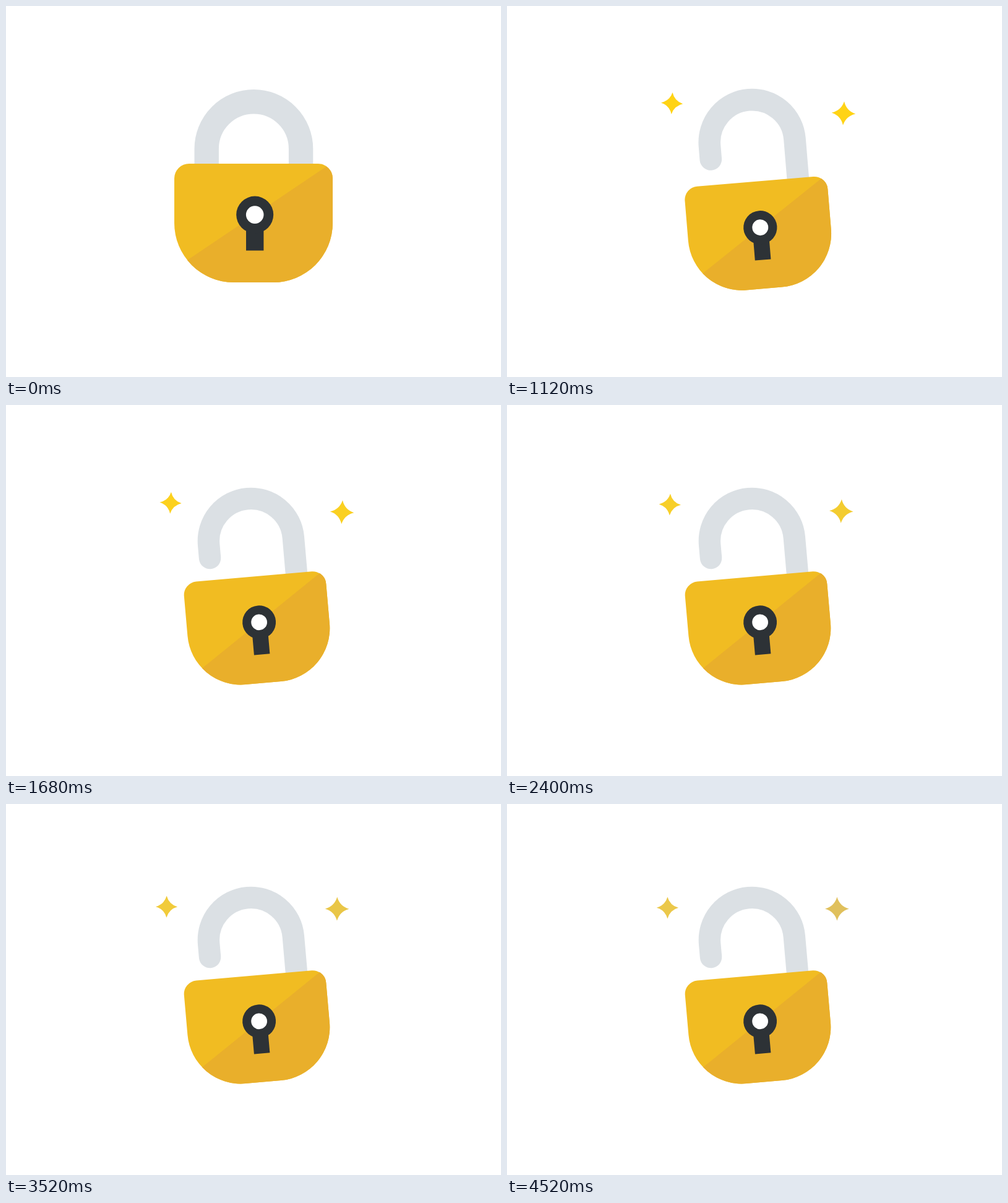
These frames come from a looping animation (800 by 600 pixels, 4.56 s). An HTML page:

```html
<!DOCTYPE html>
<html lang="en">
<head>
<meta charset="utf-8">
<title>Padlock</title>
<style>
  html, body { margin: 0; width: 100%; height: 100%; overflow: hidden; background: #fff; }
  svg { display: block; width: 800px; height: 600px; }
</style>
</head>
<body>
<svg viewBox="0 0 800 600">
  <g id="lock">
    <path d="M324.2 255V231a76.2 76.2 0 0 1 152.4 0V330" fill="none"
          stroke="#dbe0e4" stroke-width="39.4" stroke-linecap="round"/>
    <g id="body">
      <path fill="#f1bc22" d="M296 255H504a24 24 0 0 1 24 24V351a96 96 0 0 1-96 96H368a96 96 0 0 1-96-96V279a24 24 0 0 1 24-24z"/>
      <path fill="#e9af2b" d="M518 259.4A24 24 0 0 1 528 279V351a96 96 0 0 1-96 96H368a96 96 0 0 1-75-36z"/>
      <path fill="#2d3236" d="M388 345h28.4v50.6H388z"/>
      <circle cx="402.2" cy="337.6" r="30" fill="#2d3236"/>
      <circle cx="402.2" cy="337.6" r="14.3" fill="#fff"/>
    </g>
  </g>
  <path id="left" d="M0-1Q.22-.22 1 0Q.22.22 0 1Q-.22.22-1 0Q-.22-.22 0-1z"/>
  <path id="right" d="M0-1Q.22-.22 1 0Q.22.22 0 1Q-.22.22-1 0Q-.22-.22 0-1z"/>
</svg>
<script>
const LOOP = 4560, STEP = 40, OPEN = 1000;
const [lock, body, left, right] = ['lock', 'body', 'left', 'right'].map(id => document.getElementById(id));

const progress = (t, start, end) => Math.min(1, Math.max(0, (t - start) / (end - start)));
const mix = (a, b, k) => a + (b - a) * k;
const easeOut = u => 1 - (1 - u) ** 3;
const easeInOut = u => (1 - Math.cos(Math.PI * u)) / 2;
const backOut = (u, s) => 1 + (s + 1) * (u - 1) ** 3 + s * (u - 1) ** 2;

function placeStar(star, x, y, size, angle, from, to, fade) {
  star.setAttribute('transform', `translate(${x} ${y}) rotate(${angle}) scale(${size})`);
  star.setAttribute('fill', `rgb(${from.map((c, i) => Math.round(mix(c, to[i], fade)))})`);
}

function draw(t) {
  // The whole lock tilts and shrinks while the body drops away from the shackle.
  const tilt = easeOut(progress(t, OPEN, 1190));
  const drop = 40 * backOut(progress(t, OPEN, 1220), 2.2);
  lock.setAttribute('transform',
    `translate(${mix(400.4, 396, tilt)} ${mix(231, 220, tilt)}) rotate(${-5 * tilt}) ` +
    `scale(${1 - 0.1 * tilt}) translate(-400.4 -231)`);
  body.setAttribute('transform', `translate(0 ${drop})`);

  // The stars pop out, then drift inward and fade.
  const pop = Math.max(0, backOut(progress(t, OPEN, 1300), 1.5));
  const slow = easeInOut(progress(t, 1040, 4400));
  const quick = easeInOut(progress(t, 1240, 3700));
  const fade = progress(t, 1080, 4520);
  const angle = 3 * (1 - slow);
  placeStar(left, mix(266.6, 259.4, quick), mix(157.3, 167.8, slow), 17.6 * pop, angle,
    [255, 211, 20], [235, 200, 75], fade);
  placeStar(right, mix(544, 533.4, slow), mix(173.6, 169.5, quick), 19.3 * pop, angle,
    [255, 211, 20], [224, 192, 92], fade);
}

function tick() {
  const t = performance.now() % LOOP;
  draw(Math.floor(t / STEP) * STEP);
  requestAnimationFrame(tick);
}
tick();
</script>
</body>
</html>
```
